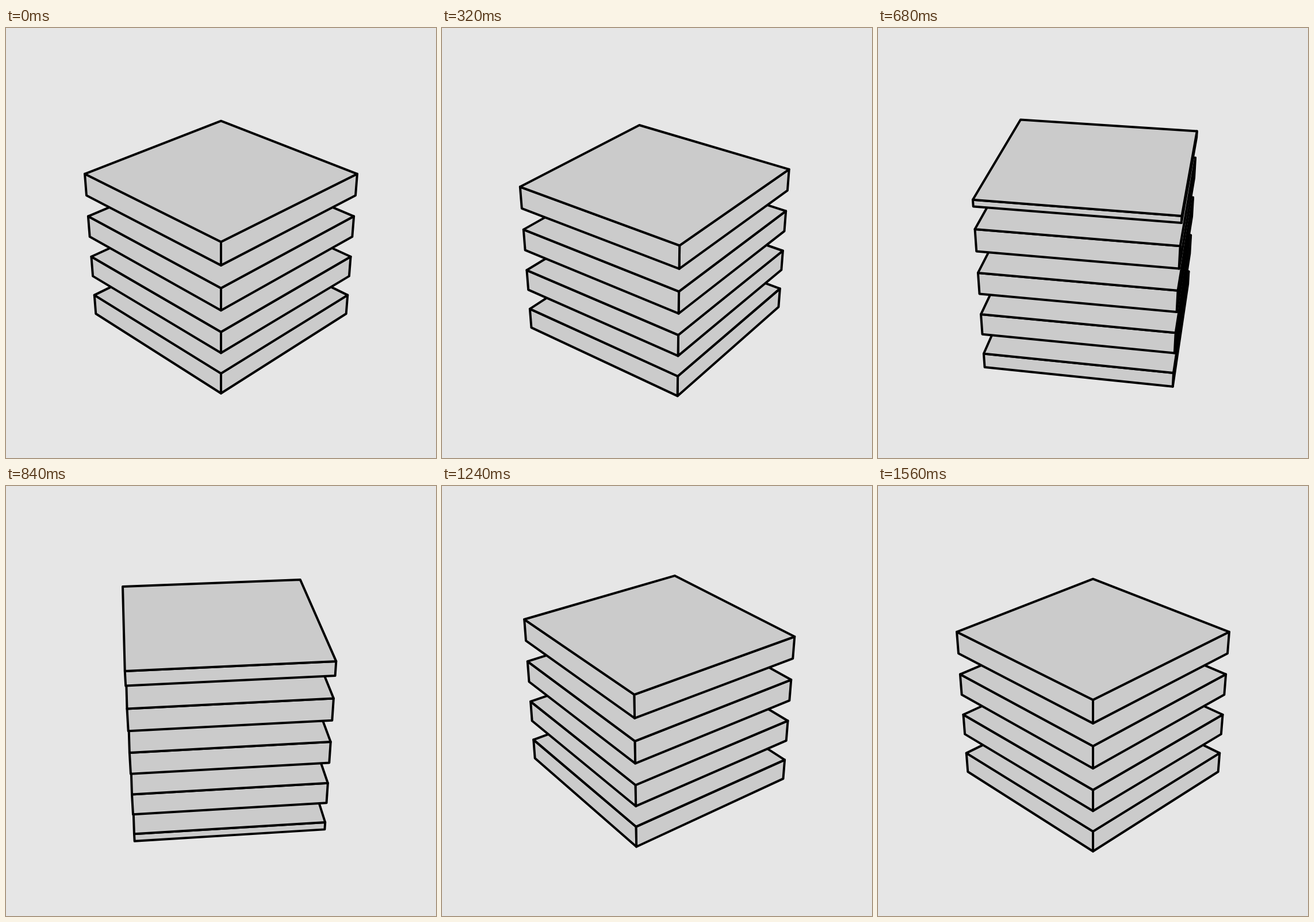
An HTML page with a canvas that plays this animation: 748x748 px, repeating every 1600 ms.

```html
<!DOCTYPE html>
<html lang="en">
<head>
<meta charset="utf-8">
<title>Rotating slabs</title>
<style>
  html, body { margin: 0; width: 100%; height: 100%; overflow: hidden; background: #e6e6e6; }
  canvas { display: block; width: 100vmin; height: 100vmin; }
</style>
</head>
<body>
<canvas id="stage" width="748" height="748"></canvas>
<script>
const ctx = document.getElementById('stage').getContext('2d');
const SIZE = 748, STEP_MS = 40, STEPS = 40;

// Lengths are measured in half diagonals of the square footprint.
const FOCAL = 1658, DISTANCE = 7.29, CENTER_X = 374, CENTER_Y = 374.3;
const SIN = 0.5, COS = Math.sqrt(0.75);
const HALF = Math.SQRT1_2, MIDDLE = -0.0317;
const TOP = MIDDLE + HALF, BOTTOM = MIDDLE - HALF;
const THICKNESS = HALF / 4, PERIOD = HALF / 2;

// Symmetric cubic Bezier with flat handles.
function ease(t) {
  const handle = 0.392;
  let low = 0, high = 1, value = 0;
  for (let i = 0; i < 30; i++) {
    const s = (low + high) / 2;
    value = s * s * (3 - 2 * s);
    const x = value + 3 * handle * s * (1 - s) * (1 - 2 * s);
    if (x < t) low = s; else high = s;
  }
  return value;
}

function project(angle, height) {
  const depth = Math.cos(angle);
  const scale = FOCAL / (DISTANCE - depth * COS - height * SIN);
  return [
    CENTER_X + Math.sin(angle) * scale,
    CENTER_Y + (depth * SIN - height * COS) * scale
  ];
}

function drawFace(points) {
  ctx.beginPath();
  points.forEach(([x, y]) => ctx.lineTo(x, y));
  ctx.closePath();
  ctx.fill();
  ctx.stroke();
}

function drawSlab(turn, low, high) {
  const corners = [0, 1, 2, 3].map(i => turn + i * Math.PI / 2);
  for (const a of corners) {
    const facing = Math.cos(a + Math.PI / 4);
    if (DISTANCE * COS * facing <= HALF) continue;
    const b = a + Math.PI / 2;
    drawFace([project(a, high), project(b, high), project(b, low), project(a, low)]);
  }
  drawFace(corners.map(a => project(a, high)));
}

function render(time) {
  const step = Math.floor(time / STEP_MS) % STEPS;
  const progress = step === STEPS - 1 ? 1 : step ? ease(step / (STEPS - 1)) : 0;
  const turn = progress * Math.PI / 2;

  ctx.fillStyle = '#e6e6e6';
  ctx.fillRect(0, 0, SIZE, SIZE);
  ctx.fillStyle = '#cbcbcb';
  ctx.strokeStyle = '#000';
  ctx.lineWidth = 4;
  ctx.lineJoin = 'round';

  // The stack sinks by one period, clipped to a cube, from the lowest slab up.
  for (let i = 0; i < 5; i++) {
    const base = BOTTOM + THICKNESS / 2 + (i - progress) * PERIOD;
    const low = Math.max(base, BOTTOM);
    const high = Math.min(base + THICKNESS, TOP);
    if (high - low > 1e-6) drawSlab(turn, low, high);
  }
}

const start = performance.now();
function tick() {
  render(performance.now() - start);
  requestAnimationFrame(tick);
}
tick();
</script>
</body>
</html>
```
